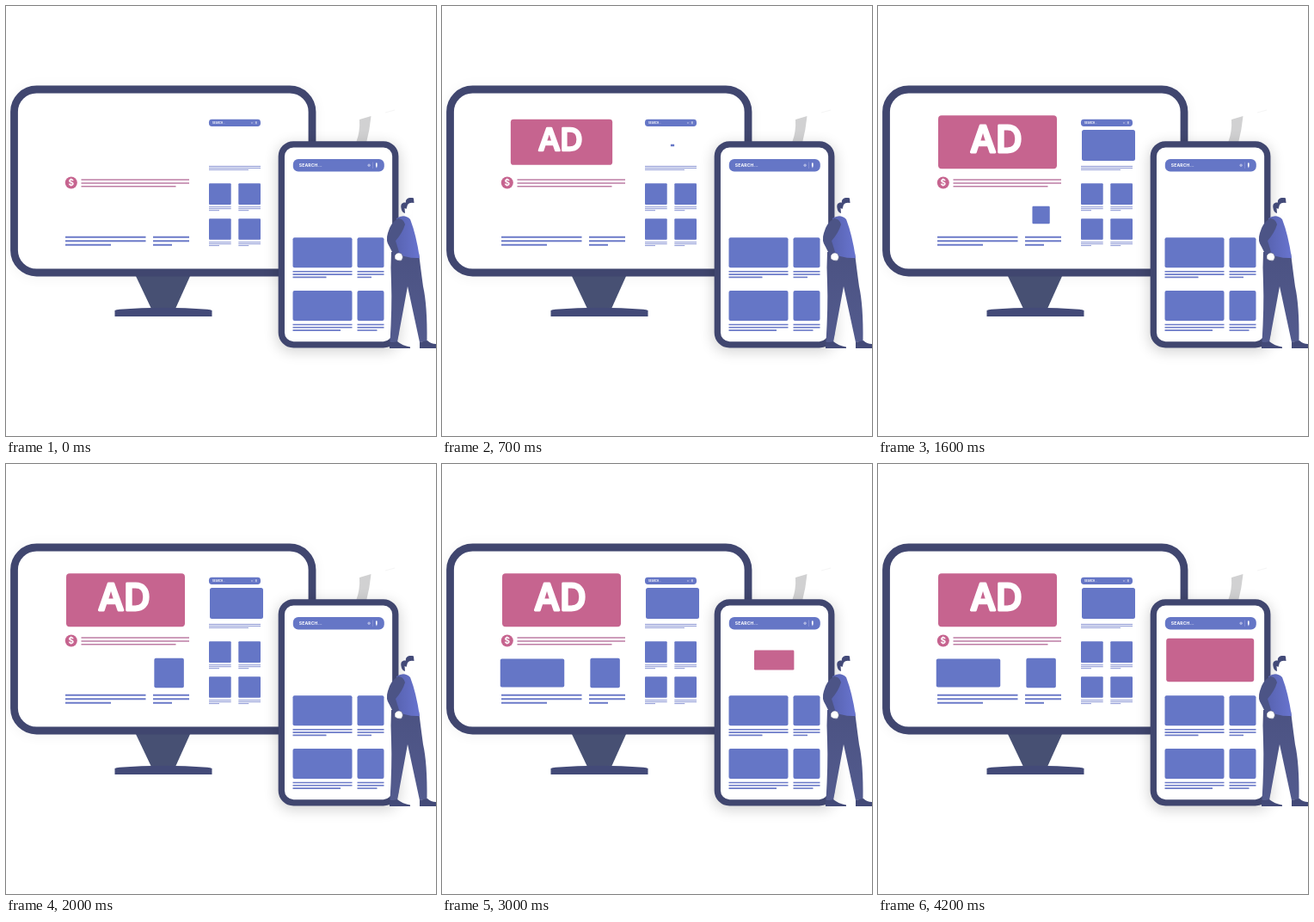
Recreate the animation shown at these times as an HTML page. Size 500 by 500 pixels, loop 5000 ms.

```html
<!DOCTYPE html>
<html lang="en">
<head>
<meta charset="utf-8">
<title>Responsive ad layout</title>
<style>
html, body { margin: 0; width: 100%; height: 100%; overflow: hidden; background: #fff; }
svg { display: block; width: 100%; height: 100%; }
text { fill: #fff; font-family: Inter, Roboto, sans-serif; font-weight: 700; }
.blue { fill: #6576c6; }
.pink { fill: #c6648f; }
.navy { fill: #434a78; }
.frame { fill: #fff; stroke: #40466f; }
.headline { font-size: 42px; font-weight: 500; text-anchor: middle; stroke: #fff; stroke-width: 2.8; stroke-linejoin: round; }
</style>
</head>
<body>
<svg viewBox="0 0 500 500">
  <defs>
    <filter id="soft" x="-30%" y="-30%" width="160%" height="160%"><feGaussianBlur stdDeviation="8"/></filter>
    <linearGradient id="shirt"><stop stop-color="#5661ad"/><stop offset="1" stop-color="#6874cf"/></linearGradient>
    <linearGradient id="trousers" x2="0" y2="1"><stop stop-color="#4b5282"/><stop offset="1" stop-color="#535b8e"/></linearGradient>
  </defs>

  <rect x="6" y="94" width="354" height="222" rx="30" opacity=".05" filter="url(#soft)"/>
  <path d="M411 132L424.500 128Q423 144 419 159H407Q412 146 411 132Z" fill="#d1d1d2"/>
  <path d="M441 124L452 121" stroke="#f5f5f5"/>

  <path d="M150 312H215L197 352H169Z" fill="#475073"/>
  <path d="M126.500 361V354Q128 353 132 352.700Q183 349 234 352.700Q238 353 239.500 354V361Z" class="navy"/>
  <rect class="frame" x="9.500" y="97" width="346.500" height="213" rx="26" stroke-width="8.800"/>
  <g id="desktop"></g>

  <rect x="315" y="160" width="143" height="242" rx="18" opacity=".17" filter="url(#soft)"/>
  <rect class="frame" x="320.300" y="160.800" width="132.500" height="233" rx="14" stroke-width="7.300"/>
  <g id="phone"></g>

  <g id="person">
    <path d="M460 232Q472 227 473 233L472 241Q470 245 464 245Z" fill="#fff"/>
    <path d="M459.500 235C458.500 230 461 228 465 228.500C464 224 469 222 474 223.500L474.500 229Q469 228 467 231L465.500 236L463.500 235L464 241Q460 240 459.500 235Z" class="navy"/>
    <path d="M448 286L480 287Q482 304 485 326Q490 348 489.500 390L481 391L467 326L455 391H446.500Q449 350 448 322Q447 304 448 286Z" fill="url(#trousers)"/>
    <path d="M454 247Q463 241 470 248Q477 266 481 293Q466 294 450 286Q456 267 454 247Z" fill="url(#shirt)"/>
    <path d="M456 247Q447 252 444 264Q441 273 446 280L451 290L457 286L453 273Q461 264 464 254Q462 247 456 247Z" fill="#4c5486"/>
    <path d="M452 290Q455 285 460 288Q463 292 460 296Q455 297 452 294Z" fill="#fff" stroke="#434a78" stroke-width=".6"/>
    <path d="M446 398V392L455 390Q461 395 470 396.500V398ZM481 398V391L490 389Q494 393 500 393V398Z" class="navy"/>
  </g>
</svg>
<script>
const desktop = document.getElementById("desktop");
const phone = document.getElementById("phone");

function add(parent, tag, attributes, text = "") {
  const node = document.createElementNS("http://www.w3.org/2000/svg", tag);
  for (const key in attributes) node.setAttribute(key, attributes[key]);
  node.textContent = text;
  return parent.appendChild(node);
}

const box = (parent, x, y, width, height, rx = 2, color = "blue") =>
  add(parent, "rect", { x, y, width, height, rx, class: color });

// Two full lines and a shorter closing one.
function paragraph(parent, x, y, width, lastWidth, gap, weight, stroke = "#6b7ac8") {
  [width, width, lastWidth].forEach((w, i) =>
    add(parent, "path", { d: `M${x} ${y + i * gap}h${w}`, stroke, "stroke-width": weight }));
}

function searchBar(parent, x, y, scale) {
  const bar = add(parent, "g", { transform: `translate(${x} ${y}) scale(${scale})` });
  box(bar, 0, 0, 106, 14.5, 6);
  add(bar, "text", { x: 7, y: 9.2, "font-size": 5, "letter-spacing": .15 }, "SEARCH...");
  add(bar, "circle", { cx: 88.3, cy: 7.2, r: 1.3, fill: "#a3addd", stroke: "#c8cded", "stroke-width": .6 });
  add(bar, "path", { d: "M92.700 3.500v7.500", stroke: "#929dd8", "stroke-width": .6 });
  add(bar, "path", { d: "M97 5v3", stroke: "#fff", "stroke-width": 1.7, "stroke-linecap": "round" });
  add(bar, "path", { d: "M97 8v2.200", stroke: "#fff", "stroke-width": .7 });
}

searchBar(desktop, 236, 131.8, .566);
add(desktop, "circle", { cx: 75.8, cy: 205.5, r: 7, class: "pink" });
add(desktop, "text", { x: 75.8, y: 209.2, "font-size": 10, "text-anchor": "middle" }, "$");
paragraph(desktop, 87.5, 202, 125.5, 110, 3.9, 1.5, "#bd7ca4");
paragraph(desktop, 69, 268.8, 93.5, 53, 4.5, 2);
paragraph(desktop, 171, 268.8, 42, 22, 4.5, 2);
paragraph(desktop, 236, 186.4, 60, 46, 2, .8);
for (const x of [236, 270.3]) {
  for (const y of [206.3, 247.2]) {
    box(desktop, x, y, 25.7, 24.6, 1);
    paragraph(desktop, x, y + 27.4, 25.7, 12, 2, .8);
  }
}

searchBar(phone, 333.8, 178, 1);
for (const [y, lastWide, lastNarrow] of [[269.3, 39, 16.5], [331, 55.5, 23]]) {
  box(phone, 333.5, y, 69, 35);
  box(phone, 408.5, y, 31, 35);
  paragraph(phone, 333.5, y + 39.5, 69, lastWide, 3.3, 1.6);
  paragraph(phone, 408.5, y + 39.5, 31, lastNarrow, 3.3, 1.6);
}

// Blocks that grow from their centre between start and end (ms).
const blocks = [];
function growing(parent, start, end, cx, cy, width, height, color, rx = 2) {
  const node = add(parent, "g", {});
  box(node, -width / 2, -height / 2, width, height, rx, color);
  blocks.push({ node, start, end, cx, cy });
  return node;
}
const banner = growing(desktop, 100, 800, 139, 158.3, 138, 62, "pink", 4);
add(banner, "text", { x: -1.6, y: 11.5, class: "headline" }, "AD");
growing(desktop, 650, 1380, 268, 162, 62, 36, "blue", 2.5);
growing(desktop, 1200, 1880, 189.6, 243, 34.5, 34.5, "blue");
growing(desktop, 2300, 2960, 105, 243, 74.5, 33, "blue");
growing(phone, 2600, 3480, 386.2, 228.1, 102, 50.5, "pink", 3);

const LOOP = 5000, STEP = 100;
const origin = performance.now();
function draw() {
  const elapsed = Math.max(0, performance.now() - origin) % LOOP;
  const time = Math.floor(elapsed / STEP) * STEP;
  for (const { node, start, end, cx, cy } of blocks) {
    const scale = Math.min(1, Math.max(0, (time - start) / (end - start)));
    node.setAttribute("transform", `translate(${cx} ${cy}) scale(${scale})`);
  }
  requestAnimationFrame(draw);
}
draw();
</script>
</body>
</html>
```
